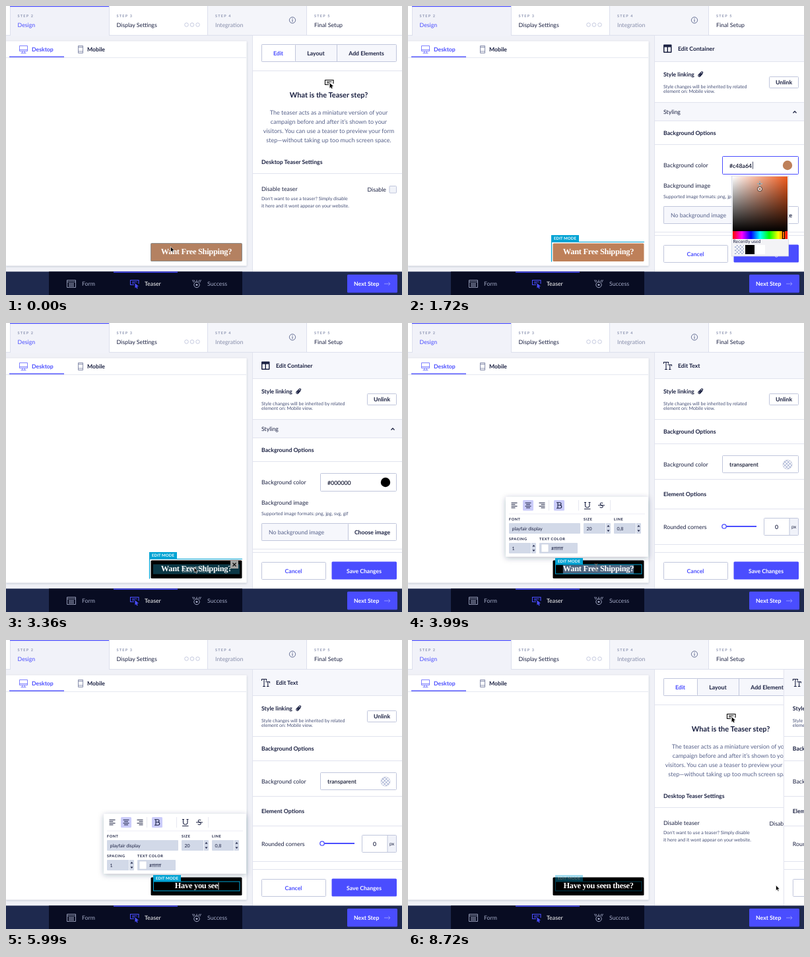
Recreate the animation shown at these times as an HTML page. Size 600 by 439 pixels, loop 8820 ms.

```html
<!DOCTYPE html>
<html lang="en">
<head>
<meta charset="utf-8">
<title>Teaser editor</title>
<style>
html, body { margin: 0; width: 100%; height: 100%; overflow: hidden; background: #fff }
svg { display: block; width: 100%; height: 100% }
text { font-family: Lato, "Open Sans", sans-serif; text-rendering: geometricPrecision; white-space: pre }
.serif { font-family: "Playfair Display", "Liberation Serif", "Noto Serif", serif }
</style>
</head>
<body>
<svg id="stage" viewBox="0 0 600 439" preserveAspectRatio="none"></svg>
<script>
const INK = '#1b2142', MUTED = '#56618a', BLUE = '#4a4dff', EDGE = '#e1e3ee', BOX = '#c0c6dc',
      PALE = '#f6f7fc', CYAN = '#00a3d4', BROWN = '#be8059', FIELD = '#d2d9e8';
const LOOP = 8820, OLD = 'Want Free Shipping?', NEW = 'Have you seen these?';

// Markup helpers
const text = (x, y, s, { size = 8.8, fill = INK, weight = 400, anchor = 'start', gap = 0, more = '' } = {}) =>
  `<text x="${x}" y="${y}" font-size="${size}" fill="${fill}" font-weight="${weight}" text-anchor="${anchor}" letter-spacing="${gap}" ${more}>${s}</text>`;
const bold = (x, y, s, o = {}) => text(x, y, s, { size: 8.7, weight: 700, ...o });
const mid = (x, y, s, o = {}) => bold(x, y, s, { anchor: 'middle', ...o });
const small = (x, y, s) => text(x, y, s, { size: 7.1, fill: '#465077' });
const caps = (x, y, s, o = {}) => text(x, y, s, { size: 5.5, weight: 700, gap: .6, ...o });
const rect = (x, y, w, h, fill, more = '') => `<rect x="${x}" y="${y}" width="${w}" height="${h}" fill="${fill}" ${more}/>`;
const frame = (x, y, w, h, fill = '#fff', stroke = BOX, more = '') => rect(x, y, w, h, fill, `stroke="${stroke}" rx="1" ${more}`);
const path = (d, stroke = INK, width = 1, fill = 'none', more = '') =>
  `<path d="${d}" stroke="${stroke}" stroke-width="${width}" fill="${fill}" ${more}/>`;
const dot = (x, y, r, fill, more = '') => `<circle cx="${x}" cy="${y}" r="${r}" fill="${fill}" ${more}/>`;
const group = (id, body, more = '') => `<g id="${id}" ${more}>${body}</g>`;
const rule = y => rect(374, y, 226, 1, EDGE);
const bubble = (x, y, c) =>
  path(`M${x + 6} ${y + 7.5}H${x + .5}V${y + .5}H${x + 13}V${y + 6}M${x + 3} ${y + 3}H${x + 10.5}M${x + 3} ${y + 5}H${x + 7}`, c, 1.1) +
  path(`M${x + 7.5} ${y + 5}l5.5 5l-2.6 .3l1.3 2.5l-1.4 .6l-1.2 -2.5l-1.6 1.8z`, 'none', 0, c);

const defs = `<defs>
  <pattern id="check" width="5" height="5" patternUnits="userSpaceOnUse">${rect(0, 0, 5, 5, '#fff')}
    ${rect(0, 0, 2.5, 2.5, '#b4bdd9')}${rect(2.5, 2.5, 2.5, 2.5, '#b4bdd9')}</pattern>
  <linearGradient id="tint"><stop stop-color="#fff"/><stop offset="1" stop-color="#f05a1c"/></linearGradient>
  <linearGradient id="shade" x2="0" y2="1"><stop stop-opacity="0"/><stop offset="1"/></linearGradient>
  <linearGradient id="hue">${[0, 300, 240, 180, 120, 60, 0].map((h, i) =>
    `<stop offset="${i / 6}" stop-color="hsl(${h},100%,50%)"/>`).join('')}</linearGradient>
  <filter id="soft" x="-10%" y="-20%" width="120%" height="150%">
    <feDropShadow dx="0" dy="1" stdDeviation="1.6" flood-color="#20294d" flood-opacity=".26"/></filter>
  <filter id="lift" x="-10%" y="-20%" width="120%" height="150%">
    <feDropShadow dx="0" dy="2" stdDeviation="4" flood-color="#20294d" flood-opacity=".3"/></filter>
</defs>`;

function header() {
  const step = (x, n, s, fill) => caps(x, 17, 'STEP ' + n, { fill: '#8d95b2', gap: 1.25 }) + text(x, 32, s, { fill });
  return rect(0, 0, 600, 45, '#fff') + rect(7, 0, 149, 46, '#f1f2f9') + rect(306, 0, 150, 45, '#f4f5fa') +
    [6, 156, 305, 455].map(x => rect(x, 0, 1, 45, '#dde0ed')).join('') +
    rect(0, 44, 7, 1, '#dde0ed') + rect(156, 44, 444, 1, '#dde0ed') + rect(6, 0, 150, 1.2, BLUE) +
    step(17.5, 2, 'Design', BLUE) + step(167.5, 3, 'Display Settings') +
    step(317, 4, 'Integration', '#868daa') + step(467, 5, 'Final Setup') +
    [273.5, 282, 290.5].map(x => dot(x, 28.5, 2.8, 'none', 'stroke="#c5cae0"')).join('') +
    dot(434, 21.5, 4.6, 'none', `stroke="${MUTED}" stroke-width=".9"`) + rect(433.5, 20.5, 1, 3.6, MUTED) + rect(433.5, 18.7, 1, 1, MUTED);
}

function canvasCard() {
  return rect(0, 53.5, 364.5, 341, '#fff', 'filter="url(#soft)" rx="1"') +
    rect(0, 78, 364, 1, '#e6e8f1') + rect(5, 76.5, 83, 1.4, BLUE) +
    path('M20.500 60.500H32.500V68.500H20.500ZM20.500 66.500H32.500M24.500 71.500L25 68.500M28.500 71.500L28 68.500M22.500 71.500H30.500', BLUE, .7) +
    bold(39, 69, 'Desktop', { fill: BLUE }) +
    path('M109.500 60.500H116.500V71.500H109.500ZM109.500 62.500H116.500M109.500 69H116.500', MUTED, .7) + bold(123, 69, 'Mobile');
}

function footer() {
  const c = '#a3aac6';
  return rect(0, 403.5, 600, 36, '#1e294e') + rect(65, 403.5, 293, 36, '#080c22') + rect(163, 403.5, 97, 1.6, BLUE) +
    path('M92.500 416.500H105.500V427.500H92.500ZM92.500 419H105.500M95 421.500H103M95 423.500H103M95 425.500H103', c, .9) +
    text(115, 425, 'Form', { fill: c }) + bubble(188, 416, BLUE) + text(210, 425, 'Teaser', { fill: '#fff' }) +
    dot(289, 423.5, 4.2, 'none', `stroke="${c}"`) + dot(289, 423.5, 1.5, c) +
    path('M284.500 420L282.500 416M286.500 419L284.500 416M291.500 419L293.500 416M293.500 420L295.500 416M289 416V419', c, .9) +
    text(305, 425, 'Success', { fill: c }) +
    rect(517, 408, 76, 27.5, BLUE, 'rx="1.5"') + bold(527, 425, 'Next Step', { fill: '#fff' }) +
    path('M573 422H582M579.500 419.500L582 422L579.500 424.500', '#9b9dff', .9);
}

function basePanel() {
  const lines = ['The teaser acts as a miniature version of your', 'campaign before and after it’s shown to your',
    'visitors. You can use a teaser to preview your form', 'step—without taking up too much screen space.'];
  return rect(373, 45, 227, 358.5, '#fff') + rect(373, 45, 1, 358.5, EDGE) +
    frame(387.5, 58.5, 204, 26, PALE) + frame(387.5, 58.5, 51, 26) + rect(501, 59, 1, 25, BOX) +
    mid(412.5, 75, 'Edit', { fill: BLUE }) + mid(469.5, 75, 'Layout') + mid(546, 75, 'Add Elements') + rule(98) +
    bubble(483, 112, '#000') + mid(489, 138.5, 'What is the Teaser step?', { size: 11 }) +
    lines.map((s, i) => text(489, 165 + 14 * i, s, { size: 9.05, fill: MUTED, anchor: 'middle' })).join('') +
    bold(387, 240, 'Desktop Teaser Settings') + rule(254) + text(387, 281, 'Disable teaser') +
    text(576, 282, 'Disable', { anchor: 'end' }) + frame(581, 273.5, 10.5, 10.5, '#f1f3f9', BOX) +
    small(387, 295, "Don't want to use a teaser? Simply disable") + small(387, 305.5, 'it here and it wont appear on your website.');
}

// Shared frame of the two sliding panels
function editPanel(title, icon, body) {
  return rect(373, 45, 227, 358.5, '#fff') + rect(374, 45, 226, 39, PALE) + rule(84) + icon + bold(409, 68, title) +
    bold(387, 107, 'Style linking') +
    path('M446.500 102.500l-3.800 4.300q-1.800 1.300 -2.800 -.6q-.4 -.9 .3 -1.700l4.300 -4.300q1.600 -.9 2.300 .7l-4.300 4.700q-.8 .4 -1.100 -.4l2.900 -3.200', INK, 1.1) +
    small(387, 124.5, 'Style changes will be inherited by related') + small(387, 131.5, 'element on: Mobile view.') +
    frame(547.5, 107.5, 44, 17) + mid(569.5, 119.2, 'Unlink') + rule(146) + body +
    rect(374, 348, 226, 55.5, '#fff') + rule(348) +
    frame(387.5, 363.5, 97, 26) + mid(435.5, 380, 'Cancel', { fill: BLUE }) +
    rect(493.5, 362.5, 98.5, 27, BLUE, 'rx="1.5"') + mid(542.5, 380, 'Save Changes', { fill: '#fff' }) + rect(373, 45, 1, 358.5, EDGE);
}

const container = editPanel('Edit Container',
  rect(387, 58.5, 12.5, 12.5, INK, 'rx="1"') + rect(388.5, 62.5, 4, 7, '#fff') + rect(394, 62.5, 4, 7, '#fff'),
  rect(374, 147, 226, 27, PALE) + rule(174) + text(387, 164, 'Styling') + path('M583.500 162.500L586 160L588.500 162.500', INK, 1.3) +
  bold(387, 195.5, 'Background Options') + rule(210) + text(387, 245, 'Background color') +
  frame(476.5, 228.5, 115, 27, '#fff', BOX, 'id="field"') +
  text(487, 245.5, '', { weight: 600, more: 'id="hex"', fill: '#10152f' }) + dot(575, 242, 7.2, BROWN, 'id="swatch"') +
  rect(522, 236.5, .8, 11, INK, 'id="hexCaret"') +
  text(387, 276, 'Background image') + small(387, 291.5, 'Supported image formats: png, jpg, svg, gif') +
  frame(387.5, 304.5, 204, 26) + frame(387.5, 304.5, 131, 26, PALE) +
  text(398, 320.5, 'No background image', { fill: MUTED }) + mid(555, 320.5, 'Choose image') + rule(343));

const textPanel = editPanel('Edit Text',
  path('M387 59.500H395M391 59.500V70.500M389 70.500H393M387.500 59V62M394.500 59V62M393.500 63.500H400M396.800 63.500V70.500M395 70.500H398.500M399.500 63V65.500', INK, 1.1),
  bold(387, 168, 'Background Options') + rule(183) + text(387, 218, 'Background color') +
  frame(476.5, 201.5, 115, 26) + text(487, 218, 'transparent', { weight: 600, size: 8.6, fill: '#10152f' }) +
  dot(575, 215, 7, 'url(#check)', `stroke="${BOX}" stroke-width=".7"`) + rule(237) +
  bold(387, 263, 'Element Options') + rule(282) + text(387, 312.5, 'Rounded corners') +
  rect(482, 308, 46, 2, BLUE) + dot(479, 309, 3.2, '#fff', `stroke="${BLUE}" stroke-width="1.3"`) +
  frame(539.5, 296.5, 52, 26) + rect(578, 297, 13, 25, '#f0f2f9') + rect(577.5, 297, 1, 25, BOX) +
  text(558.5, 313, '0', { anchor: 'middle', weight: 600 }) + text(584.7, 312, 'px', { anchor: 'middle', size: 7.1 }) + rule(336));

function picker() {
  return rect(490.5, 258, 86, 122, '#f3f3f6', 'stroke="#d4d7e4" stroke-width=".8"') +
    rect(492, 259, 83, 83, 'url(#tint)') + rect(492, 259, 83, 83, 'url(#shade)') + rect(492, 342, 83, 12, 'url(#hue)') +
    rect(567.5, 342.5, 3, 11, 'none', 'stroke="#000"') + text(492.5, 359.8, 'Recently used', { size: 6.9 }) +
    rect(495, 363, 14, 14, 'url(#check)') + rect(511, 363, 14, 14, '#000') + rect(527, 363, 14, 14, '#fff') +
    group('pick', dot(0, 0, 2.6, 'none', 'stroke="#fff" stroke-width="1.3"') + dot(0, 0, 3.5, 'none', 'stroke="#000" stroke-width=".6"'));
}

function toolbar() {
  const lines = (x, offset) => [0, 2.5, 5, 7.5].map((d, i) => `M${x + (i % 2 ? offset : 0)} ${273.3 + d}h${i % 2 ? 6 : 9}`).join('');
  const input = (x, y, w, s) => rect(x, y, w, 16, FIELD, 'rx="1"') + text(x + 4.5, y + 10.7, s, { size: 7.1 });
  const spinner = (x, y, s) => input(x, y, 41, s) + rect(x + 33, y, .8, 16, '#fff') +
    path(`M${x + 35.5} ${y + 5.5}h4l-2 -2.5zM${x + 35.5} ${y + 10.5}h4l-2 2.5z`, 'none', 0, INK);
  return rect(148, 264, 216, 91, '#fff', 'filter="url(#lift)" rx="1"') + rect(153, 289.5, 206, 1, '#eceef5') +
    rect(174, 269, 16, 16, '#cbccfa', 'rx="1.5"') + rect(221, 269, 16, 16, '#cbccfa', 'rx="1.5"') +
    [213, 258, 306].map(x => rect(x, 269, .8, 16, EDGE)).join('') +
    path(lines(156.5, 0) + lines(177.5, 1.5) + lines(198.5, 3), INK, 1.1) +
    path('M225 272.800H230A2 2 0 0 1 230 276.800H227H230.500A2.200 2.200 0 0 1 230.500 281.200H225M227 272.800V281.200', INK, 1.1) +
    path('M268.500 272.500V277A3.200 3.200 0 0 0 275 277V272.500M267 272.500H270M273.500 272.500H276.500M267 282.500H276.500', INK, 1.1) +
    mid(293, 281, 'S', { size: 11.5, weight: 400 }) + rect(288, 276.5, 10, 1, INK) +
    caps(153, 300, 'FONT') + input(153, 304, 108, 'playfair display') + caps(266, 300, 'SIZE') + spinner(266, 304, '20') +
    caps(312, 300, 'LINE') + spinner(312, 304, '0,8') + caps(153, 330, 'SPACING') + spinner(153, 334, '1') +
    caps(199, 330, 'TEXT COLOR') + input(199, 334, 58, '') + rect(202, 336, 11, 12, '#fff', 'stroke="#c3cadb" stroke-width=".6"') +
    text(217, 344.7, '#ffffff', { size: 7.1 });
}

const tag = (x, y) => rect(x, y, 42, 10, CYAN) + text(x + 21, y + 7.3, 'EDIT MODE', { size: 6, weight: 700, fill: '#fff', anchor: 'middle', gap: .1 });
const line = { size: 12.4, weight: 700, fill: '#fff', anchor: 'middle', gap: -.28 };

const teaser = rect(219.5, 360.5, 138, 27.5, BROWN, 'id="bar" rx="1.5"') +
  group('hover', rect(219.5, 360.5, 138, 27, '#7c868a', 'fill-opacity=".16" stroke="#8b8d8c" rx="1"')) +
  rect(223, 366.5, 131, 15, '#0b3846', 'id="veil"') +
  rect(0, 367.5, 0, 13.5, '#4d6580', 'id="marked"') + text(288.5, 377.3, OLD, { ...line, more: 'id="line" class="serif"' }) +
  rect(0, 368.5, .9, 11, '#fff', 'id="caret"') +
  group('hint',
    ['CLICK TO EDIT', 'DRAG TO MOVE'].map((s, i) => text(288, 374 + 5.3 * i, s, { size: 5.6, fill: '#c9d3d6', anchor: 'middle' })).join('') +
    rect(340, 361, 12, 12, '#a3a3a1') + path('M343.500 364.500l5 5m0 -5l-5 5', '#111', 1.4)) +
  group('boxEdit', path('M217.500 388.500V358.500H358', CYAN, 1.2) + tag(217, 348)) +
  group('tools', toolbar()) +
  group('textEdit', rect(223.5, 367, 130.5, 14, 'none', `stroke="${CYAN}"`) + tag(223, 357));

const pointers = group('pointer',
  group('arrow', path('M0 0V8.200L1.900 6.500L3.200 9.300L4.500 8.700L3.200 6H5.600Z', '#fff', .6, '#000')) +
  group('beam', path('M-2.500 -5Q0 -5 0 -3.500Q0 -5 2.500 -5M0 -4V4M-2.500 5Q0 5 0 3.500Q0 5 2.500 5', '#777', 1.1)) +
  group('cross', path('M-4 0H4M0 -4V4', '#fff', 2) + path('M-4 0H4M0 -4V4', '#444', .9)));

stage.innerHTML = defs + rect(0, 0, 600, 439, '#f0f1f7') + header() + canvasCard() + teaser + basePanel() +
  group('panelA', container + group('picker', picker())) + group('panelB', textPanel) + footer() + pointers;

// Motion
const $ = id => document.getElementById(id);
const show = (id, on) => $(id).style.display = on ? '' : 'none';
const set = (id, attrs) => Object.entries(attrs).forEach(([k, v]) => $(id).setAttribute(k, v));
const ease = (t, from, to) => { const p = Math.min(1, Math.max(0, (t - from) / (to - from))); return p * p * (3 - 2 * p); };
const route = [[0, 249.5, 365.5], [250, 268, 371], [500, 268, 371], [1150, 575, 242], [1350, 575, 242], [1680, 533, 270],
  [1880, 533, 270], [2150, 518, 369], [2500, 518, 369], [3250, 285, 371], [7300, 285, 371], [8100, 557.5, 372.5], [LOOP, 557.5, 372.5]];

function pointerAt(t) {
  const i = Math.max(1, route.findIndex(k => k[0] > t)), [a, x, y] = route[i - 1], [b, u, v] = route[i], p = ease(t, a, b);
  return [x + (u - x) * p, y + (v - y) * p];
}

function draw(t) {
  const black = t >= 2250, typing = t >= 4700, typed = Math.max(0, Math.floor((t - 4780) / 100));
  const colour = black ? '#000000' : BROWN;
  set('bar', { fill: colour });
  set('swatch', { fill: colour });
  $('hex').textContent = black ? '#000000' : '#c48a64';
  $('line').textContent = typing ? NEW.slice(0, typed) : OLD;
  const width = $('line').getComputedTextLength();
  set('marked', { x: 288.5 - width / 2, width });
  set('caret', { x: 288.8 + width / 2 });
  show('marked', t >= 3600 && !typing);
  show('caret', typing && t < 8350 && (t < 6780 || (t - 6780) % 1060 < 530));

  const hinted = t >= 3180 && t < 3500;
  show('hover', t < 400);
  show('boxEdit', t >= 400 && t < 3500);
  show('veil', hinted);
  show('hint', hinted);
  show('tools', t >= 3600 && t < 8450);
  show('textEdit', t >= 3600);
  set('textEdit', { opacity: Math.min(1, (LOOP - t) / 270) });

  const open = t >= 1350 && t < 2600;
  show('picker', open);
  show('hexCaret', open && !black);
  set('field', { stroke: open ? BLUE : BOX });
  set('pick', { transform: black ? 'translate(493 341)' : 'translate(533 278)' });

  show('panelA', t >= 380 && t < 3760);
  set('panelA', { transform: `translate(${227 * (1 - ease(t, 380, 720))} 0)` });
  show('panelB', t >= 3450);
  set('panelB', { transform: `translate(${227 * (1 - ease(t, 3450, 3720) + ease(t, 8500, 8788))} 0)` });

  const beam = t >= 3500 && t < 4700, cross = t >= 1500 && t < 2020;
  show('beam', beam);
  show('cross', cross);
  show('arrow', !beam && !cross && (t < 4700 || t >= 7300));
  set('pointer', { transform: `translate(${pointerAt(t)})` });
}

const start = performance.now();
function tick() {
  draw((performance.now() - start) % LOOP);
  requestAnimationFrame(tick);
}
tick();
</script>
</body>
</html>
```
